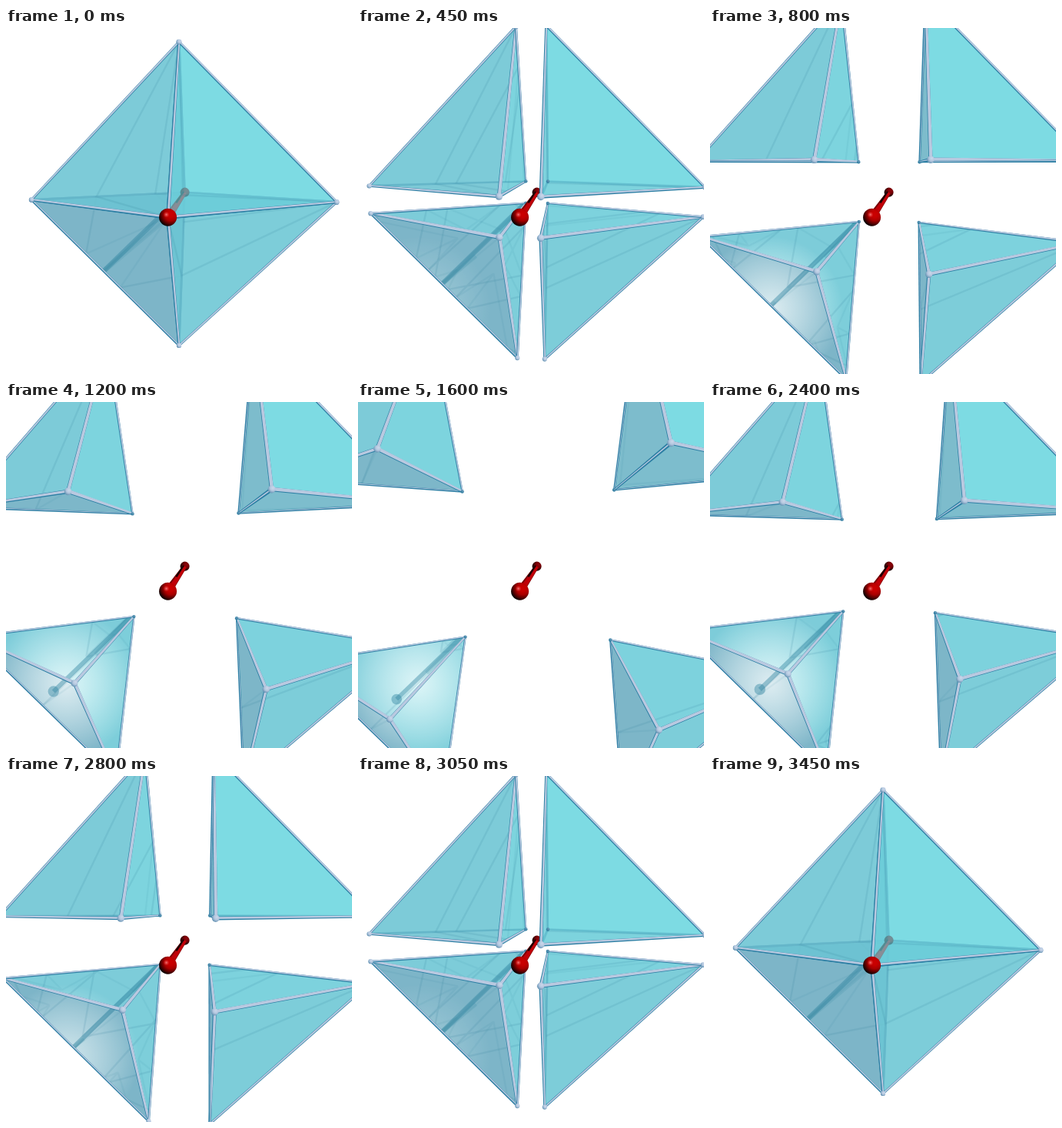
Write an HTML page with a canvas that moves like this. It is 450 px wide and 450 px high and loops after 3.5 s.

```html
<!DOCTYPE html>
<html lang="en">
<head>
<meta charset="utf-8">
<title>Octahedron in four parts</title>
<style>
html, body { margin: 0; width: 100%; height: 100%; overflow: hidden; background: #fff; }
canvas { display: block; width: 450px; height: 450px; }
</style>
</head>
<body>
<canvas id="stage" width="450" height="450"></canvas>
<script>
const ctx = document.getElementById('stage').getContext('2d');
const LOOP = 3500, STEP = 50;
const FRONT = [0, 0, 1], BACK = [0, 0, -1];
const CAMERA = [0.15, 0.245, 3.16];
const RAYS = [-0.633, -0.5985, -0.7685];
const LIGHT = [0.5, 0.45, 0.4];
const PAIRS = [[0, 1], [0, 2], [0, 3], [1, 2], [1, 3], [2, 3]];
const ALPHA = 0.65;

const dot = (a, b) => a[0] * b[0] + a[1] * b[1] + a[2] * b[2];
const add = (a, b, k = 1) => a.map((v, i) => v + k * b[i]);
const lerp = (a, b, k) => a.map((v, i) => v + (b[i] - v) * k);
const clamp = (v, lo, hi) => Math.max(lo, Math.min(hi, v));

// Perspective: screen x, screen y, pixels per unit
function project([x, y, z]) {
  const w = 1 - 0.033 * x - 0.0475 * y - 0.31 * z;
  return [
    (225 + 190.86 * x - 10.7 * y - 79.7 * z) / w,
    (224.9 - 5.95 * x - 207.7 * y - 55 * z) / w,
    198 / w
  ];
}

// Parts rest, move out at constant speed, and return
function spread(t) {
  return Math.max(0, 1500 - Math.abs(t - 1750)) / 1500 * Math.SQRT1_2;
}

function makePart(sx, sy, d) {
  const shift = [sx * d, sy * d, 0];
  const verts = [[0, sy, 0], [sx, 0, 0], FRONT, BACK].map(p => add(p, shift));
  const q = 1 / Math.sqrt(3);
  // Face i lies opposite vertex i
  const normals = [
    [0, -sy, 0], [-sx, 0, 0],
    [sx * q, sy * q, -q], [sx * q, sy * q, q]
  ];
  const faces = normals.map((n, i) => {
    const pts = verts.filter((_, j) => j !== i);
    return { n, pts, lit: dot(n, LIGHT), open: dot(n, add(CAMERA, pts[0], -1)) > 0 };
  });
  return { verts, faces, shiny: sx < 0 && sy < 0 };
}

function tube(p, q, r, color, dx = 0, dy = 0) {
  const [x1, y1, s1] = project(p), [x2, y2, s2] = project(q);
  const len = Math.hypot(x2 - x1, y2 - y1) || 1;
  const nx = (y1 - y2) / len, ny = (x2 - x1) / len;
  const a = r * s1, b = r * s2;
  ctx.fillStyle = color;
  ctx.beginPath();
  ctx.moveTo(x1 + nx * a + dx, y1 + ny * a + dy);
  ctx.lineTo(x2 + nx * b + dx, y2 + ny * b + dy);
  ctx.lineTo(x2 - nx * b + dx, y2 - ny * b + dy);
  ctx.lineTo(x1 - nx * a + dx, y1 - ny * a + dy);
  ctx.fill();
}

// Sphere lit from the upper right
function ball(p, r, stops) {
  const [x, y, s] = project(p);
  const R = r * s, cx = x + R * 0.32, cy = y - R * 0.34;
  const g = ctx.createRadialGradient(cx, cy, 0, cx, cy, R * 1.45);
  stops.forEach((c, i) => g.addColorStop(i / (stops.length - 1), c));
  ctx.fillStyle = g;
  ctx.beginPath();
  ctx.arc(x, y, R, 0, 7);
  ctx.fill();
}

// Shadow of a segment on a plane, keeping only the lit side
function castSegment(a, b, n, origin) {
  const nl = dot(n, RAYS);
  const reach = p => dot(n, add(origin, p, -1)) / nl;
  let sa = reach(a), sb = reach(b);
  if (Math.max(sa, sb) < 0.002) return null;
  if (sa < 0) { a = lerp(a, b, sa / (sa - sb)); sa = 0; }
  if (sb < 0) { b = lerp(b, a, sb / (sb - sa)); sb = 0; }
  return [project(add(a, RAYS, sa)), project(add(b, RAYS, sb))];
}

function strokeSegments(list, width, color) {
  ctx.strokeStyle = color;
  ctx.lineWidth = width;
  ctx.beginPath();
  for (const [a, b] of list) {
    ctx.moveTo(a[0], a[1]);
    ctx.lineTo(b[0], b[1]);
  }
  ctx.stroke();
}

function clipTo(face) {
  ctx.beginPath();
  face.pts.forEach(p => ctx.lineTo(...project(p).slice(0, 2)));
  ctx.closePath();
  ctx.clip();
}

function drawShadows(face, edges) {
  const { n, pts, open } = face;
  if (Math.abs(dot(n, RAYS)) < 0.1) return;
  const cast = ([a, b]) => castSegment(a, b, n, pts[0]);
  ctx.save();
  clipTo(face);
  strokeSegments(edges.map(cast).filter(Boolean), 2.4, `rgba(40,115,145,${open ? 0.07 : 0.13})`);
  const axis = cast([BACK, FRONT]);
  if (axis) {
    const [k, f] = axis;
    const color = `rgba(45,130,158,${open ? 0.16 : 0.42})`;
    strokeSegments([axis], 0.018 * (k[2] + f[2]), color);
    if (!open) {
      // The part of the disc beyond the bar's end
      ctx.fillStyle = color;
      ctx.beginPath();
      ctx.arc(f[0], f[1], 0.04 * f[2], 0, 7);
      ctx.fill();
    }
  }
  ctx.restore();
}

function fillFace(face, gloss) {
  const g = Math.min(217, 192 + 46 * face.lit), b = Math.min(226, 208 + 34 * face.lit);
  ctx.save();
  clipTo(face);
  ctx.fillStyle = `rgba(108,${g},${b},${ALPHA})`;
  ctx.fillRect(0, 0, 450, 450);
  if (gloss > 0) {
    const shine = ctx.createRadialGradient(78, 366, 0, 78, 366, 95);
    const peak = gloss * (face.open ? 0.66 : 0.9);
    shine.addColorStop(0, `rgba(255,255,255,${peak})`);
    shine.addColorStop(0.45, `rgba(255,255,255,${peak * 0.55})`);
    shine.addColorStop(1, 'rgba(255,255,255,0)');
    ctx.fillStyle = shine;
    ctx.fillRect(0, 0, 450, 450);
  }
  ctx.restore();
}

function drawRod({ p, q, seen }) {
  const lit = seen.reduce((sum, f) => sum + f.lit, 0) / seen.length;
  const rim = seen.length === 1;
  const r = rim ? 0.0078 : 0.0088;
  tube(p, q, r, '#2b7ea3');
  tube(p, q, r * clamp(0.82 + 1.1 * lit, 0.25, rim ? 0.62 : 0.84), '#b9c9e0', 0.35, -0.5);
}

function drawPart(part, edges, d, between) {
  const { verts, faces } = part;
  const gloss = part.shiny ? Math.min(1, d / 0.25) : 0;
  const near = faces.filter(f => f.open), far = faces.filter(f => !f.open);
  const rods = PAIRS.filter(([i, j]) => d > 0.01 || i + j < 5).map(([i, j]) => ({
    p: verts[i], q: verts[j],
    seen: faces.filter((f, k) => k !== i && k !== j && f.open)
  }));

  far.forEach(f => fillFace(f, gloss));
  rods.filter(r => !r.seen.length).forEach(r => tube(r.p, r.q, 0.008, '#5a93b0'));
  if (between) between();
  near.forEach(f => fillFace(f, gloss));
  faces.forEach(f => drawShadows(f, edges));
  rods.filter(r => r.seen.length).forEach(drawRod);
  verts.forEach((p, i) => {
    if (i < 3) ball(p, 0.0165, ['#cbd8ea', '#b4c7df', '#5f8fb0']);
    else if (d > 0.01) ball(p, 0.0145, ['#6b9dbb', '#25779c']);
  });
}

function drawAxis() {
  ball(BACK, 0.04, ['#8c060c', '#7c0006', '#400002', '#000']);
  tube(BACK, FRONT, 0.018, '#780004');
  tube(BACK, FRONT, 0.0125, '#c00008', 0.6, 0.3);
  tube(BACK, lerp(BACK, FRONT, 0.6), 0.006, '#180002', -1.5, -0.8);
}

function drawFrontBall() {
  ball(FRONT, 0.04, ['#cc0000', '#c40000', '#a80000', '#580000', '#000']);
  const [x, y] = project(FRONT);
  const g = ctx.createRadialGradient(x - 2, y - 3.5, 0, x - 2, y - 3.5, 4);
  g.addColorStop(0, 'rgba(255,150,150,.8)');
  g.addColorStop(1, 'rgba(255,60,60,0)');
  ctx.fillStyle = g;
  ctx.fillRect(x - 6, y - 8, 8, 9);
}

function draw(t) {
  const d = spread(t);
  const parts = [[-1, -1], [-1, 1], [1, -1], [1, 1]].map(([x, y]) => makePart(x, y, d));
  const edges = parts.flatMap(({ verts }) => PAIRS.map(([i, j]) => [verts[i], verts[j]]));
  ctx.fillStyle = '#fff';
  ctx.fillRect(0, 0, 450, 450);
  // Far to near; the axis shows through the last part
  parts.forEach((part, i) => drawPart(part, edges, d, i === 3 ? drawAxis : null));
  drawFrontBall();
}

let start = null, last = -1;
function tick(now) {
  if (start === null) start = now;
  const t = Math.floor((now - start) % LOOP / STEP) * STEP;
  if (t !== last) draw(last = t);
  requestAnimationFrame(tick);
}
draw(0);
requestAnimationFrame(tick);
</script>
</body>
</html>
```
